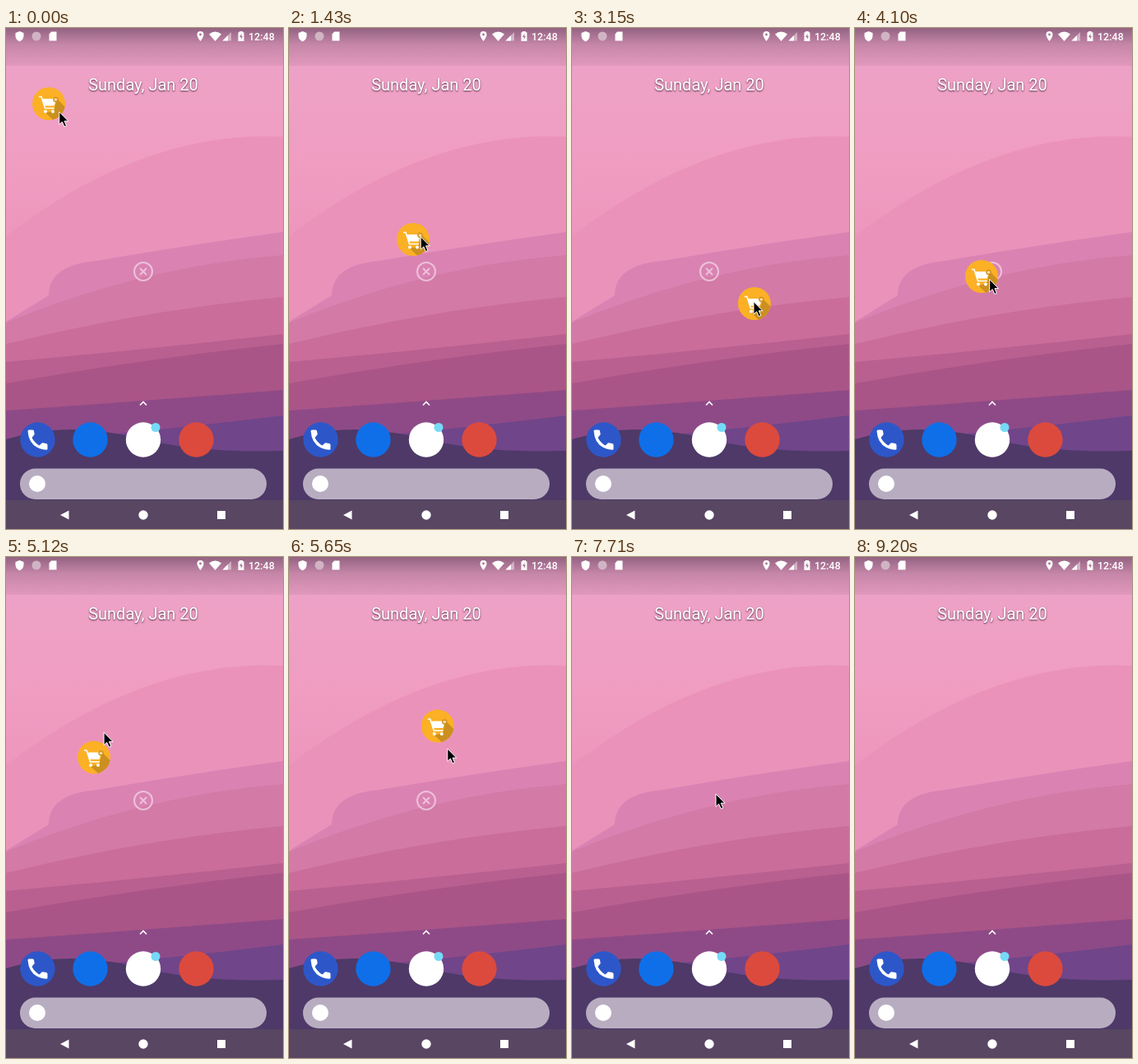
An HTML page that plays this animation: 337 by 609 pixels, repeating every 9.72 s.

```html
<!DOCTYPE html>
<html lang="en">
<head>
<meta charset="utf-8">
<title>Draggable bubble</title>
<style>
  html, body { margin: 0; width: 100%; height: 100%; overflow: hidden; }
  svg { display: block; width: 100vw; height: 100vh; }
  text { font-family: Roboto, sans-serif; fill: #fff; }
  .date { font-size: 20px; text-anchor: middle; text-shadow: 0 1px 2px rgba(50, 20, 45, .85); }
  .clock { font-size: 12.5px; font-weight: 500; }
</style>
</head>
<body>
<svg viewBox="0 0 337 609" preserveAspectRatio="none">
  <defs>
    <linearGradient id="sky" x2="0" y2="1">
      <stop offset="0" stop-color="#eda3c8"/>
      <stop offset=".4" stop-color="#f09dc2"/>
      <stop offset="1" stop-color="#ea8cb6"/>
    </linearGradient>
    <linearGradient id="shade" x2="0" y2="1">
      <stop offset="0" stop-color="#4a2f48" stop-opacity=".55"/>
      <stop offset=".45" stop-color="#4a2f48" stop-opacity=".24"/>
      <stop offset="1" stop-color="#4a2f48" stop-opacity=".08"/>
    </linearGradient>
    <clipPath id="disc"><circle r="20"/></clipPath>
  </defs>

  <rect width="337" height="400" fill="url(#sky)"/>
  <path fill="#eb92bb" d="M0 253Q168 124 337 132V420H0Z"/>
  <path fill="#da83b3" d="M337 248Q220 264 110 283Q52 288 52 325L0 357H337Z"/>
  <g id="ridges"></g>
  <path fill="#4e3968" d="M0 500Q40 488 80 488Q125 490 160 498Q230 517 337 514V609H0Z"/>
  <rect y="574" width="337" height="35" fill="#584663"/>
  <rect width="337" height="46" fill="url(#shade)"/>

  <g id="status" fill="#fff">
    <path d="M16.500 4L21.500 6V10Q21 14.500 16.500 16.500Q12 14.500 11.500 10V6Z"/>
    <circle cx="37" cy="10" r="5.500" fill="#d0b4c4"/>
    <path d="M55 4.500H61.500V15.500H52.500V7.500Z"/>
    <path d="M236.500 4A4 4 0 0 1 240.500 8Q240.500 11 236.500 16Q232.500 11 232.500 8A4 4 0 0 1 236.500 4Z"/>
    <circle cx="236.500" cy="8" r="1.400" fill="#a77592"/>
    <path d="M247 7.500Q254.500 1.500 262 7.500L254.500 16Z"/>
    <path d="M274 5V15.500H263.500Z" opacity=".45"/>
    <path d="M270 9V15.500H263.500Z"/>
    <path d="M284 4H288V5.300H289.500V16H282.500V5.300H284Z"/>
    <path d="M286.500 7L284 11H285.800V14L288 10H286.500Z" fill="#a77592"/>
    <text class="clock" x="295" y="14.500">12:48</text>
  </g>
  <text class="date" x="167" y="76">Sunday, Jan 20</text>

  <g id="dock">
    <path d="M163 458.500L167 454.500L171 458.500" fill="none" stroke="#fff" stroke-width="1.600"/>
    <circle cx="38.500" cy="500.500" r="21.200" fill="#2d57c9"/>
    <path fill="#fff" d="M28 488.500H32.500Q33.700 488.500 34 490L34.700 494L31.500 498Q34.500 504 40.500 507.500L44 504.300L49 505Q50.500 505.300 50.500 507V511.500Q50.500 512.800 49 512.800Q28 511 26.500 490Q26.500 488.500 28 488.500Z"/>
    <circle cx="102.500" cy="500.500" r="21.200" fill="#0f6fe8"/>
    <circle cx="167" cy="500.500" r="21.200" fill="#fff"/>
    <circle cx="182" cy="485.500" r="5.500" fill="#75daf7"/>
    <circle cx="231.500" cy="500.500" r="21.200" fill="#dc4a3d"/>
    <rect x="17" y="535.500" width="300" height="37.500" rx="18.700" fill="#b8adc0"/>
    <circle cx="38" cy="554" r="10" fill="#fff"/>
    <path d="M66 592L76.500 586.500V597.500Z" fill="#fff"/>
    <circle cx="167" cy="592" r="5.700" fill="#fff"/>
    <rect x="257" y="587" width="10" height="10" fill="#fff"/>
  </g>

  <g id="bin" transform="translate(167 296)" fill="none" stroke="#fff" stroke-opacity=".5" stroke-width="2">
    <circle r="11"/>
    <path d="M-4 -4L4 4M4 -4L-4 4"/>
  </g>

  <g id="bubble">
    <circle r="20" fill="#fbb025"/>
    <path clip-path="url(#disc)" fill="#cb901f" d="M10 -6L30 14V30H16L-4 11L6 9Z"/>
    <g fill="#fff">
      <path d="M-8 -6H9.500L6.500 2.500H-5.500Z"/>
      <path d="M-12 -8.500H-9L-4.500 5.500H7" fill="none" stroke="#fff" stroke-width="1.600"/>
      <circle cx="-4" cy="9.500" r="2"/>
      <circle cx="5" cy="9.500" r="2"/>
    </g>
    <circle cx="8.500" cy="-5" r="2.800" fill="#f3b64a" stroke="#bd8420"/>
    <path d="M7 -5H10" stroke="#fff"/>
  </g>

  <path id="cursor" stroke="#fff" d="M0 0V15.500L3.600 12.200L6.200 18L8.800 16.900L6.300 11.200H11Z"/>
</svg>

<script>
const LOOP = 9720, LAG = 75, DROP = 6510, GONE = 6540, EXIT = 9200;
const GRIP = [10, 2], BIN = [168, 295];

const $ = id => document.getElementById(id);
const clamp = v => Math.min(1, Math.max(0, v));
const mix = (a, b, u) => a + (b - a) * u;
const mixPoint = (a, b, u) => a.map((v, k) => mix(v, b[k], u));

const steady = u => u;
const smooth = u => u * u * (3 - 2 * u);
const speedUp = u => u ** 1.5;

// A hill whose crest passes the given heights at the left, middle and right edge.
const ridge = (color, left, middle, right) =>
  `<path fill="${color}" d="M0 ${left}Q168 ${2 * middle - (left + right) / 2} 337 ${right}V540H0Z"/>`;

$("ridges").innerHTML = [
  ridge("#d37aa7", 358, 303, 276),
  ridge("#ca6d9a", 384, 349, 327),
  ridge("#b96090", 406, 390, 372),
  ridge("#aa5587", 432, 405, 384),
  ridge("#8e4a87", 465, 453, 440),
  ridge("#70458a", 505, 490, 471)
].join("");

// Pointer gestures: straight glides and swirls around a centre, in degrees.
const glide = (start, end, from, to, ease = smooth) =>
  ({ start, end, at: u => mixPoint(from, to, ease(u)) });

const swirl = (start, end, { center, radius, angle, swell = 0, squash = 1, ease = steady }) => ({
  start, end,
  at(u) {
    const p = ease(u), a = mix(...angle, p) * Math.PI / 180;
    const r = mix(...radius, p) + swell * Math.sqrt(Math.max(0, Math.sin(Math.PI * p)));
    return [center[0] + squash * r * Math.cos(a), center[1] + r * Math.sin(a)];
  }
});

const gestures = [
  glide(-75, 80, [62, 94], [70, 117], speedUp),
  glide(420, 1140, [70, 117], [161, 259]),
  swirl(1410, 3075, { center: [158, 288], radius: [30, 89], angle: [-87, 393], swell: 65, ease: speedUp }),
  glide(3075, 3400, [232, 337], [185, 318], steady),
  swirl(3400, 4025, { center: [160, 258], radius: [78, 47], angle: [50, 440], squash: 0.5 }),
  glide(4025, 4540, [164, 304], [158, 328]),
  swirl(4540, 6075, { center: [158, 236], radius: [92, 68], angle: [90, 419], squash: 0.48, ease: smooth }),
  glide(7530, 7710, [175, 294], [175, 288]),
  swirl(8595, 8910, { center: [156, 417], radius: [131, 130], angle: [-80, -261], squash: 0.85 }),
  glide(9060, EXIT, [138, 545], [232, 611])
];

function pointerAt(time) {
  const g = gestures.findLast(g => g.start <= time);
  return g.at(clamp((time - g.start) / (g.end - g.start)));
}

// The bubble trails the pointer and is finally pulled into the bin.
const bubbleAt = time => mixPoint(
  pointerAt(time - LAG).map((v, k) => v - GRIP[k]), BIN, clamp((time - 5900) / 250));

const place = (el, [x, y], scale = 1) =>
  el.setAttribute("transform", `translate(${x.toFixed(2)} ${y.toFixed(2)}) scale(${scale})`);
const show = (el, opacity) => el.setAttribute("opacity", opacity);

function draw() {
  const time = performance.now() % LOOP;
  const presence = time < DROP ? 1 : time < GONE ? 0.5 : 0;
  place($("bubble"), bubbleAt(time), presence);
  place($("cursor"), pointerAt(time));
  show($("bubble"), presence && 1);
  show($("bin"), presence);
  show($("cursor"), time < EXIT ? 1 : 0);
  requestAnimationFrame(draw);
}
draw();
</script>
</body>
</html>
```
